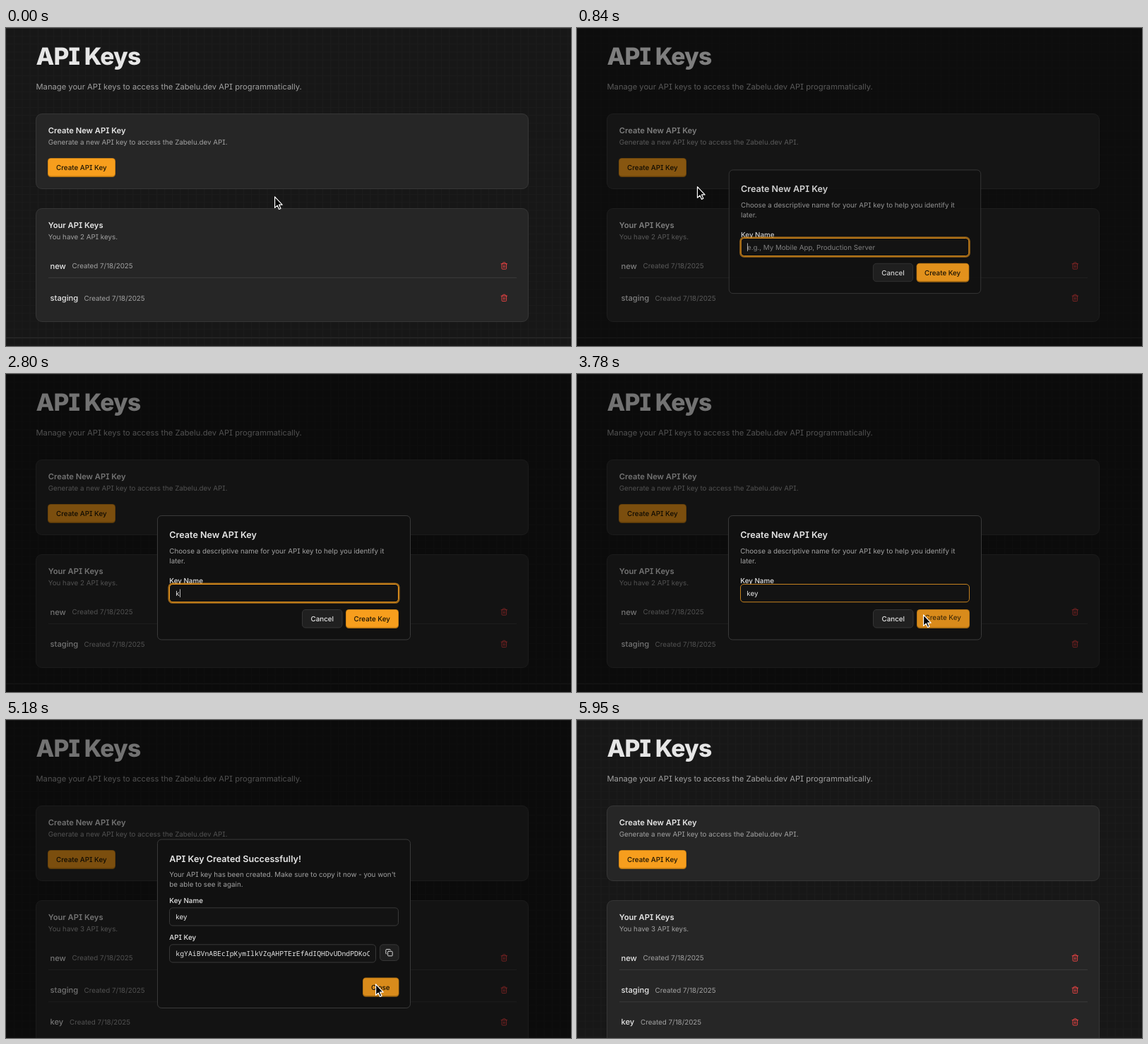
Animation, 800 px wide and 450 px high, one loop 6.16 s. Source, as an HTML page:

```html
<!DOCTYPE html>
<html lang="en">
<head>
<meta charset="utf-8">
<title>API Keys</title>
<style>
  html, body { margin: 0; width: 100%; height: 100%; overflow: hidden; background: #171717; }
  svg { display: block; width: 800px; height: 450px; }
  text {
    font-family: Inter, sans-serif; font-size: 9.8px; fill: #e6e6e6;
    font-feature-settings: "cv08"; font-optical-sizing: none;
    text-rendering: geometricPrecision; white-space: pre;
  }
  .h1 { font-size: 33.6px; font-weight: 800; letter-spacing: -.025em; }
  .h2 { font-size: 12.6px; font-weight: 600; }
  .h3 { font-size: 11.2px; font-weight: 600; }
  .row { font-size: 11.2px; font-weight: 500; }
  .lead { font-size: 11.2px; fill: #a1a1a1; }
  .muted { fill: #a1a1a1; }
  .hint { fill: #8c8c8c; }
  .label { font-weight: 500; }
  .dark { font-weight: 500; fill: #1a1204; }
  .mono { font-family: "Noto Sans Mono", monospace; }
  .icon { fill: none; stroke-width: 2; stroke-linecap: round; stroke-linejoin: round; }
</style>
</head>
<body>
<svg id="stage" viewBox="0 0 800 450" xmlns="http://www.w3.org/2000/svg">
  <defs>
    <pattern id="grid" width="11.2" height="11.2" patternUnits="userSpaceOnUse">
      <path d="M0 .5H11.2M.5 0V11.2" stroke="#fff" stroke-opacity=".018"/>
    </pattern>
    <clipPath id="keyClip"><rect x="239" y="318" width="276" height="25"/></clipPath>
  </defs>
</svg>
<script>
const LOOP = 6160, STEP = 70;
const T = {
  open: 700, blur: 3710, created: 3920, close: 5390, fade: 200,
  hide: 1610, show: 3360
};
const AMBER = '#f79e1d';
const PRODUCT = 'Zabelu.dev';
const TRASH = 'M3 6h18M19 6v14a2 2 0 0 1-2 2H7a2 2 0 0 1-2-2V6m3 0V4a2 2 0 0 1 2-2h4a2 2 0 0 1 2 2v2M10 11v6M14 11v6';
const COPY = 'M10 8h10a2 2 0 0 1 2 2v10a2 2 0 0 1-2 2H10a2 2 0 0 1-2-2V10a2 2 0 0 1 2-2zM4 16c-1.1 0-2-.9-2-2V4c0-1.1.9-2 2-2h10c1.1 0 2 .9 2 2';
const ARROW = 'M.6 .8V16.4L4.2 13.1 6.6 18.5 9 17.4 6.6 12.1H11.2Z';

// time, value of the name field
const typing = [[700, ''], [1610, 'j'], [2030, ''], [2800, 'k'], [3010, 'ke'], [3290, 'key']];
// start, end, from, to
const moves = [
  [70, 610, [380, 238], [110, 199]],
  [680, 1240, [110, 199], [428, 331]],
  [3360, 3660, [428, 331], [490, 340]],
  [4270, 4690, [490, 340], [523, 373]],
  [5390, 5810, [523, 373], [548, 462]]
];

const svg = document.getElementById('stage');

function add(parent, tag, attrs = {}) {
  const node = document.createElementNS(svg.namespaceURI, tag);
  for (const k in attrs) node.setAttribute(k, attrs[k]);
  parent.appendChild(node);
  return node;
}
const set = (node, attrs) => { for (const k in attrs) node.setAttribute(k, attrs[k]); };
const group = (parent = svg) => add(parent, 'g');

function text(parent, x, y, str, cls = '') {
  const node = add(parent, 'text', { x, y, class: cls });
  node.textContent = str;
  return node;
}
function box(parent, x, y, right, bottom, r, fill, stroke) {
  return add(parent, 'rect', { x, y, width: right - x, height: bottom - y, rx: r, fill, stroke });
}
function icon(parent, cx, cy, d, stroke, size = 11.2) {
  const s = size / 24;
  add(parent, 'path', { d, stroke, class: 'icon', transform: `translate(${cx - size / 2} ${cy - size / 2}) scale(${s})` });
}
function primary(parent, x, y, right, bottom, label, tx) {
  const g = group(parent);
  const face = group(g);
  box(face, x, y, right, bottom, 4.5, '#b87512', 'none');
  box(face, x + .7, y + .7, right - .7, bottom - 1.6, 4, AMBER, 'none');
  const caption = text(g, tx, (y + bottom) / 2 + 3.6, label, 'dark');
  const hover = (px, py, on = true) =>
    face.setAttribute('opacity', on && px >= x && px <= right && py >= y && py <= bottom ? .87 : 1);
  return { caption, hover };
}
const field = (parent, x, y, right, bottom) => box(parent, x, y, right, bottom, 4.5, '#131313', '#383838');

// Page
box(svg, 0, 0, 800, 450, 0, '#171717', 'none');
box(svg, 0, 0, 800, 450, 0, 'url(#grid)', 'none');
box(svg, 0, 0, 800, 1, 0, '#2b2b2b', 'none');
const footer = box(svg, 0, 438, 800, 439, 0, '#2b2b2b', 'none');

text(svg, 42.5, 52.2, 'API Keys', 'h1');
text(svg, 42.5, 87.4, `Manage your API keys to access the ${PRODUCT} API programmatically.`, 'lead');

box(svg, 42.5, 121.5, 739.5, 227.5, 8.4, '#262626', '#363636');
text(svg, 59.8, 148.5, 'Create New API Key', 'h3');
text(svg, 59.8, 164.6, `Generate a new API key to access the ${PRODUCT} API.`, 'muted');
const createBtn = primary(svg, 59, 184, 155, 211, 'Create API Key', 71);

const listCard = box(svg, 42.5, 255.5, 739.5, 415.5, 8.4, '#262626', '#363636');
text(svg, 59.8, 283, 'Your API Keys', 'h3');
const count = text(svg, 59.8, 299, '', 'muted');

function row(i, name, dateX) {
  const g = group(), y = 336.5 + i * 45.4;
  if (i) box(g, 60, y - 29, 723, y - 28, 0, '#3a3a3a', 'none');
  text(g, 62.5, y + 4, name, 'row');
  text(g, dateX, y + 3.6, 'Created 7/18/2025', 'muted');
  icon(g, 705.3, y, TRASH, '#ef4444');
  return g;
}
row(0, 'new', 93.5);
row(1, 'staging', 110.5);
const newRow = row(2, 'key', 90);

const overlay = box(svg, 0, 0, 800, 450, 0, '#000', 'none');

// Dialogs
const dialog = group();

const form = group(dialog);
box(form, 214.5, 200.5, 572.5, 376, 5.6, '#111', '#3a3a3a');
text(form, 231.3, 232, 'Create New API Key', 'h2');
text(form, 231.3, 253.6, 'Choose a descriptive name for your API key to help you identify it', 'muted');
text(form, 231.3, 267.6, 'later.', 'muted');
text(form, 231.3, 296, 'Key Name', 'label');
const ring = add(form, 'rect', { x: 230.4, y: 296.4, width: 326.2, height: 27.4, rx: 5.4, fill: 'none', stroke: AMBER, 'stroke-width': 2 });
const nameField = field(form, 231.5, 297.5, 555.5, 322.7);
const hint = text(form, 240.3, 313.7, 'e.g., My Mobile App, Production Server', 'hint');
const value = text(form, 240.3, 313.7, '');
const caret = add(form, 'rect', { y: 304.5, width: .8, height: 11.5, fill: '#e6e6e6' });
box(form, 419.5, 333.5, 476, 359, 4.5, '#202020', '#363636');
text(form, 431.5, 350, 'Cancel', 'label');
const submitBtn = primary(form, 481, 333, 556, 360, 'Create Key', 492.5);

const done = group(dialog);
box(done, 214.5, 169, 572.5, 407.5, 5.6, '#111', '#3a3a3a');
text(done, 231.3, 200.5, 'API Key Created Successfully!', 'h2');
text(done, 231.3, 222, "Your API key has been created. Make sure to copy it now - you won't", 'muted');
text(done, 231.3, 236, 'be able to see it again.', 'muted');
text(done, 231.3, 259, 'Key Name', 'label');
field(done, 231.5, 265.8, 555.5, 291);
text(done, 240.3, 282.2, 'key');
text(done, 231.3, 311, 'API Key', 'label');
field(done, 231.5, 317.8, 523.5, 343);
text(done, 240.3, 333.8, 'kgYAiBVnABEcIpKymIlkVZqAHPTErEfAdIQHDvUDndPDKoC', 'mono').setAttribute('clip-path', 'url(#keyClip)');
box(done, 529.5, 317.8, 556, 340.5, 4.5, '#1f1f1f', '#363636');
icon(done, 542.5, 329.2, COPY, '#e6e6e6');
const closeBtn = primary(done, 505, 364.5, 556.5, 391.7, 'Close', 517);

const pointer = add(svg, 'path', { d: ARROW, fill: '#000', stroke: '#fff', 'stroke-width': 1.2, 'stroke-linejoin': 'round' });

// Motion
const clamp = v => Math.max(0, Math.min(1, v));
const progress = (t, start, length) => clamp((t - start) / length);
const easeOut = p => 1 - (1 - p) ** 2;
const easeInOut = p => (1 - Math.cos(Math.PI * p)) / 2;
const show = (node, on) => node.setAttribute('visibility', on ? 'inherit' : 'hidden');

function pointerAt(t) {
  let at = moves[0][2];
  for (const [start, end, from, to] of moves) {
    if (t < start) break;
    const p = easeInOut(progress(t, start, end - start));
    at = from.map((v, i) => v + (to[i] - v) * p);
  }
  return at;
}

function render(t) {
  const [x, y] = pointerAt(t);
  const created = t >= T.created;
  const shown = easeOut(progress(t, T.open, T.fade)) - easeOut(progress(t, T.close, T.fade));
  const scale = .95 + .05 * shown;

  count.textContent = `You have ${created ? 3 : 2} API keys.`;
  show(newRow, created);
  show(footer, !created);
  listCard.setAttribute('height', created ? 205.5 : 160);

  overlay.setAttribute('opacity', .5 * shown);
  set(dialog, {
    opacity: shown,
    transform: `translate(393.5 288.3) scale(${scale}) translate(-393.5 -288.3)`
  });
  show(form, !created);
  show(done, created);

  const [since, typed] = typing.filter(k => k[0] <= t).pop() || typing[0];
  value.textContent = typed;
  show(hint, !typed);
  caret.setAttribute('x', 240.3 + (typed ? value.getComputedTextLength() + .3 : 0));
  show(caret, !created && t < 3850 && (t - since) % 980 < 490);

  ring.setAttribute('opacity', .62 * (1 - progress(t, T.blur, 70)));
  nameField.setAttribute('stroke', t < T.blur ? AMBER : t < 3850 ? '#c4811f' : '#383838');
  const lift = progress(t, T.blur, 200) ** 1.5;
  set(submitBtn.caption, { transform: `translate(0 ${-10 * lift})`, opacity: 1 - lift });

  createBtn.hover(x, y, t < T.open);
  submitBtn.hover(x, y);
  closeBtn.hover(x, y);

  pointer.setAttribute('transform', `translate(${x} ${y})`);
  show(pointer, t < T.hide || t >= T.show);
}

function tick() {
  const t = performance.now() % LOOP;
  render(Math.floor(t / STEP) * STEP);
  requestAnimationFrame(tick);
}
tick();
</script>
</body>
</html>
```
